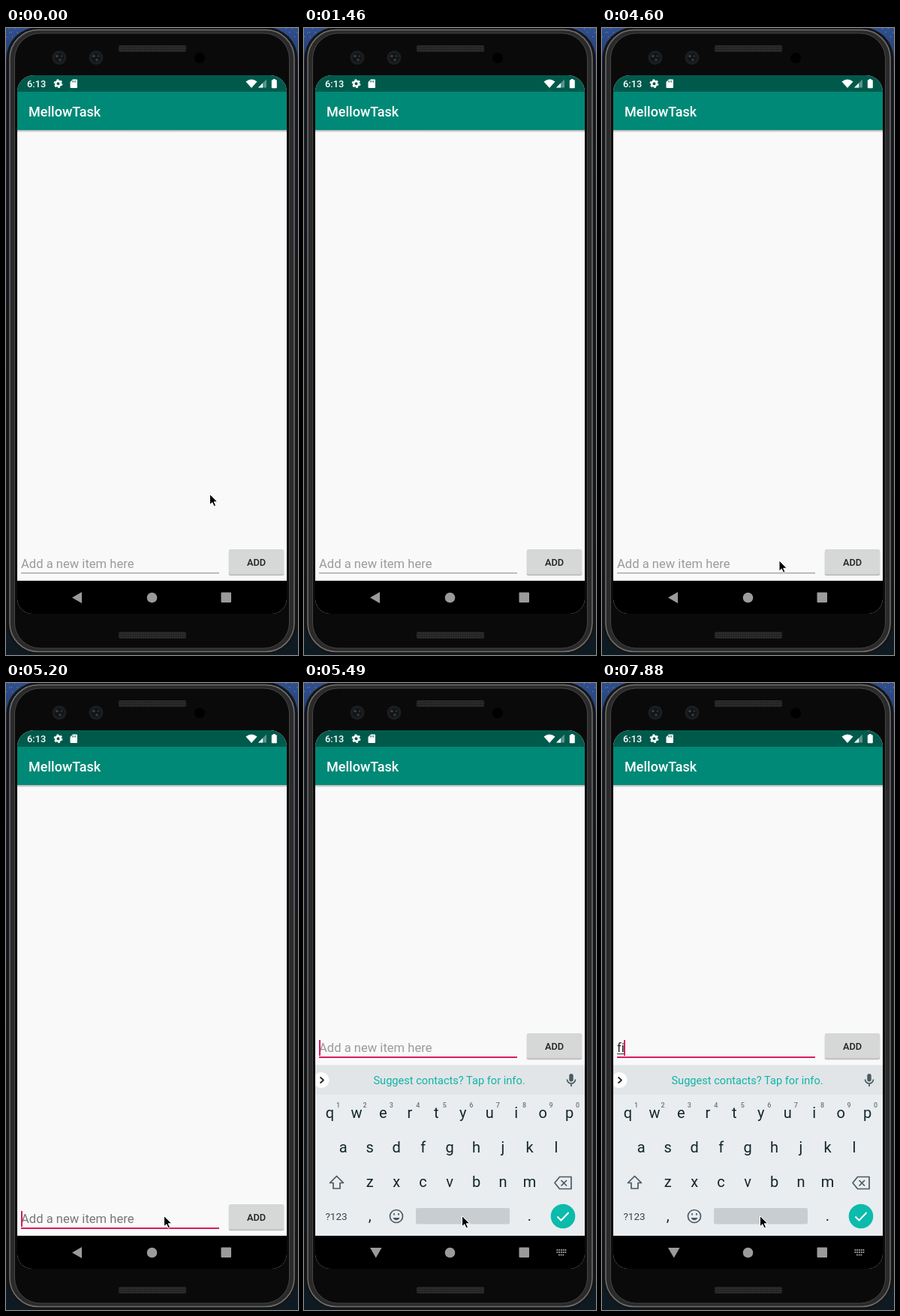
These frames come from a looping animation (389 px wide and 836 px high, 8000 ms). An HTML page:

```html
<!DOCTYPE html>
<html lang="en">
<head>
<meta charset="utf-8">
<title>To-do list on a phone</title>
<style>
html, body { margin: 0; width: 100%; height: 100%; overflow: hidden; background: #111; }
svg { display: block; width: 389px; height: 836px; font-family: Roboto, sans-serif; }
.medium { font-weight: 500; }
.keys { font-size: 20px; fill: #14262d; text-anchor: middle; }
.digits { font-size: 9px; font-weight: 500; fill: #68757c; text-anchor: middle; }
.icon { fill: none; stroke: #4b5a62; stroke-width: 1.7; stroke-linejoin: round; }
</style>
</head>
<body>
<svg viewBox="0 0 389 836">
  <defs>
    <linearGradient id="sky" x2="0" y2="1">
      <stop stop-color="#304f8d"/><stop offset=".08" stop-color="#1e3567"/><stop offset="1" stop-color="#0d1a22"/>
    </linearGradient>
    <linearGradient id="shade" x2="0" y2="1">
      <stop stop-opacity=".3"/><stop offset="1" stop-opacity="0"/>
    </linearGradient>
    <pattern id="mesh" width="3" height="3" patternUnits="userSpaceOnUse">
      <rect width="3" height="3" fill="#2b2b2b"/><circle cx="1.5" cy="1.5" r=".8" fill="#171717"/>
    </pattern>
    <clipPath id="screen"><path d="M15 85a22 22 0 0 1 22-22H352a22 22 0 0 1 22 22V761a20 20 0 0 1-20 20H35a20 20 0 0 1-20-20Z"/></clipPath>
    <g id="lens">
      <circle r="9.5" fill="#1b1e20"/><circle r="6" fill="#111416"/>
      <circle cx="-3" cy="-2" r="1.8" fill="#3a4145"/><circle cx="3" cy="-2" r="1.3" fill="#30373b"/><circle cx="1" cy="3" r="1.8" fill="#343c40"/>
    </g>
  </defs>

  <rect width="389" height="836" fill="url(#sky)"/>
  <g id="stars" fill="#9db4df"></g>
  <rect x=".5" y="-1" width="388" height="836" rx="42" fill="#151515"/>
  <rect x="5" y="2.5" width="379" height="829" rx="38" fill="#2a2a2a" stroke="#707070" stroke-width="1.5"/>
  <rect x="11.5" y="7" width="366" height="820" rx="34" fill="#0a0a0a" stroke="#454545"/>
  <rect x="150" y="23" width="90" height="9" rx="2" fill="url(#mesh)"/>
  <rect x="150" y="805" width="90" height="9" rx="2" fill="url(#mesh)"/>
  <use href="#lens" x="71" y="39.5"/>
  <use href="#lens" x="120" y="39.5"/>
  <circle cx="258" cy="40" r="7" fill="#000"/>

  <g clip-path="url(#screen)">
    <path fill="#f9f9f9" d="M15 63H374V781H15z"/>
    <path fill="#005a4c" d="M15 63H374V85H15z"/>
    <path fill="#008976" d="M15 85H374V136H15z"/>
    <rect x="15" y="136" width="359" height="3.5" fill="url(#shade)"/>

    <g fill="#fff">
      <text class="medium" x="28" y="79" font-size="12.8">6:13</text>
      <g fill="none" stroke="#fff">
        <circle cx="69.5" cy="74.2" r="3.3" stroke-width="2.6"/>
        <circle cx="69.5" cy="74.2" r="5" stroke-width="1.8" stroke-dasharray="2.6 2.636"/>
      </g>
      <path d="M89 68.5h5a1 1 0 0 1 1 1v9.5a1 1 0 0 1-1 1h-7.5a1 1 0 0 1-1-1V72z"/>
      <path d="M88.5 70v2.5m2-2.5v2.5m2-2.5v2.5" stroke="#005a4c" stroke-width=".8"/>
      <path d="M319.5 71.5Q327 65.5 334.5 71.5L327 80z"/>
      <path d="M347 68.5v11h-11z" opacity=".35"/>
      <path d="M342 73.5v6h-6z"/>
      <path d="M355.7 68h3v1.3h1.3a.8.8 0 0 1 .8.8V79.4a.8.8 0 0 1-.8.8h-5.4a.8.8 0 0 1-.8-.8V70.100a.8.8 0 0 1 .8-.8h1.100z"/>
      <text class="medium" x="30" y="118" font-size="18">MellowTask</text>
    </g>

    <g id="form">
      <text id="entry" x="20" y="720" font-size="16.6" style="font-variant-ligatures:none"></text>
      <path id="composing" d="M20 722.500h9" stroke="#333"/>
      <rect id="line" x="20"  width="264"/>
      <rect id="caret" y="704" width="2" height="21" fill="#d81b60"/>
      <rect x="296.500" y="696" width="74" height="34.500" rx="2.500" fill="#000" opacity=".12"/>
      <rect x="297" y="696" width="73" height="33.800" rx="2" fill="#000" opacity=".18"/>
      <rect x="297" y="695" width="73" height="33.500" rx="2" fill="#d6d7d7"/>
      <text class="medium" x="333.500" y="716.500" font-size="12.800" text-anchor="middle" fill="#202020">ADD</text>
    </g>

    <path fill="#000" d="M15 737H374V781H15z"/>

    <g id="keyboard">
      <path fill="#e9edf0" d="M15 509.500H374V737H15z"/>
      <path fill="#e1e5e8" d="M15 509.500H374V549H15z"/>
      <circle cx="23" cy="529.500" r="10.500" fill="#fff"/>
      <path d="M21.500 525.500l4.500 4-4.500 4" class="icon" style="stroke:#222"/>
      <text x="193.500" y="535" font-size="14.600" text-anchor="middle" fill="#10b5a6">Suggest contacts? Tap for info.</text>
      <rect x="353.300" y="521" width="5.400" height="10.500" rx="2.700" fill="#4b5a62"/>
      <path class="icon" d="M350.500 528.500a5.500 5.500 0 0 0 11 0M356 534v4"/>
      <g id="keys" class="keys"></g>
      <g id="digits" class="digits"></g>
      <path class="icon" d="M43.500 657.500l9 9h-4.500v7.500h-9v-7.500h-4.500z"/>
      <path class="icon" d="M340.500 658.500H356v16h-15.500l-6.500-8zM342.500 663l7.500 7.500m0-7.500l-7.500 7.500"/>
      <text x="43" y="716" font-size="13.500" text-anchor="middle" fill="#34444c">?123</text>
      <g class="icon">
        <circle cx="123" cy="711" r="8.500"/>
        <path d="M118.500 713a4.800 4.800 0 0 0 9 0z" fill="#4b5a62" stroke="none"/>
        <path d="M120 707v2.600m6-2.600v2.600"/>
      </g>
      <rect x="149" y="700" width="125" height="21.500" rx="2" fill="#c8cdd1"/>
      <circle cx="345" cy="711" r="16.300" fill="#0bbbab"/>
      <path d="M337.500 711.500l5 5 10-10.500" fill="none" stroke="#fff" stroke-width="2"/>
    </g>

    <g fill="#9b9b9b">
      <path id="back" d="M88 759.500l13-7.500v15z"/>
      <circle cx="194.500" cy="759.500" r="6.800"/>
      <rect x="286.500" y="752.500" width="13.500" height="13.500" rx="1"/>
      <g id="down">
        <path d="M88 753h15.500l-7.700 13.500z"/>
        <path d="M336.500 756h13M336.500 759h13M339 762.500h8" fill="none" stroke="#9b9b9b" stroke-width="1.800" stroke-dasharray="1.800 .95"/>
      </g>
    </g>
  </g>

  <path id="pointer" d="M0 0V14.200L3.300 11.200 5.600 16.300 8 15.200 5.700 10.300H10.200Z" fill="#000" stroke="#fff"/>
</svg>

<script>
const LOOP = 8000;
const $ = id => document.getElementById(id);
const show = (id, on) => $(id).setAttribute('visibility', on ? 'visible' : 'hidden');
const set = (id, attrs) => {
  for (const name in attrs) $(id).setAttribute(name, attrs[name]);
};

// Rows: first key centre, baseline, characters
const PITCH = 35.45;
const letters = [[34.5, 580, 'qwertyuiop'], [52.3, 626, 'asdfghjkl'], [87.7, 672, 'zxcvbnm'], [87.7, 717, ',     .']];
const textRow = ([x, y, chars]) => [...chars].map((char, i) => `<text x="${x + i * PITCH}" y="${y}">${char}</text>`).join('');
$('keys').innerHTML = letters.map(textRow).join('');
$('digits').innerHTML = textRow([45.5, 565.5, '1234567890']);

// Small stars in the two upper corners
$('stars').innerHTML = Array.from({ length: 14 }, (_, i) => {
  const x = (i * 7.3) % 18, y = (i * 5.7) % 17;
  return `<circle cx="${i % 2 ? x : 389 - x}" cy="${y}" r=".5"/>`;
}).join('');

// Pointer tip: time, x, y
const pointerSteps = [
  [0, 271.5, 621.5], [300, 261, 395], [440, 260, 389], [590, 261, 320],
  [730, 248.5, 210], [880, 248.5, 209.5], [1030, 251, -6], [1170, 251, -7],
  [1320, 252.5, -14], [1460, 252, -40], [4160, 312.5, 626.5], [4310, 253, 677],
  [4450, 250, 688], [4600, 236, 710], [5050, 210.5, 710.5]
];
// Time, form shift, keyboard drop, keyboard opacity
const layoutSteps = [[0, 0, 0, 0], [5350, -228, 69.5, .5], [5490, -228, 0, 1]];
// Time, caret visible
const caretSteps = [[0, 0], [5200, 1], [5790, 0], [6240, 1], [6840, 0], [7280, 1], [7730, 0], [7880, 1]];

const stepAt = (steps, t) => steps.findLast(step => step[0] <= t).slice(1);

function render(t) {
  const [px, py] = stepAt(pointerSteps, t);
  set('pointer', { transform: `translate(${px} ${py})` });

  const [shift, drop, opacity] = stepAt(layoutSteps, t);
  set('form', { transform: `translate(0 ${shift})` });
  set('keyboard', { transform: `translate(0 ${drop})`, opacity });
  show('back', !opacity);
  show('down', opacity);

  const focused = t >= 5200, typed = t >= 7880;
  set('line', focused ? { y: 726, height: 2, fill: '#d81b60' } : { y: 726, height: 1.4, fill: '#a3a3a3' });
  $('entry').textContent = typed ? 'fi' : 'Add a new item here';
  set('entry', { fill: typed ? '#222' : focused && t < 5350 ? '#777' : '#9b9b9b' });
  show('composing', typed);
  set('caret', { x: typed ? 29 : 20 });
  show('caret', stepAt(caretSteps, t)[0]);
}

const start = performance.now();
function tick() {
  render((performance.now() - start) % LOOP);
  requestAnimationFrame(tick);
}
tick();
</script>
</body>
</html>
```
